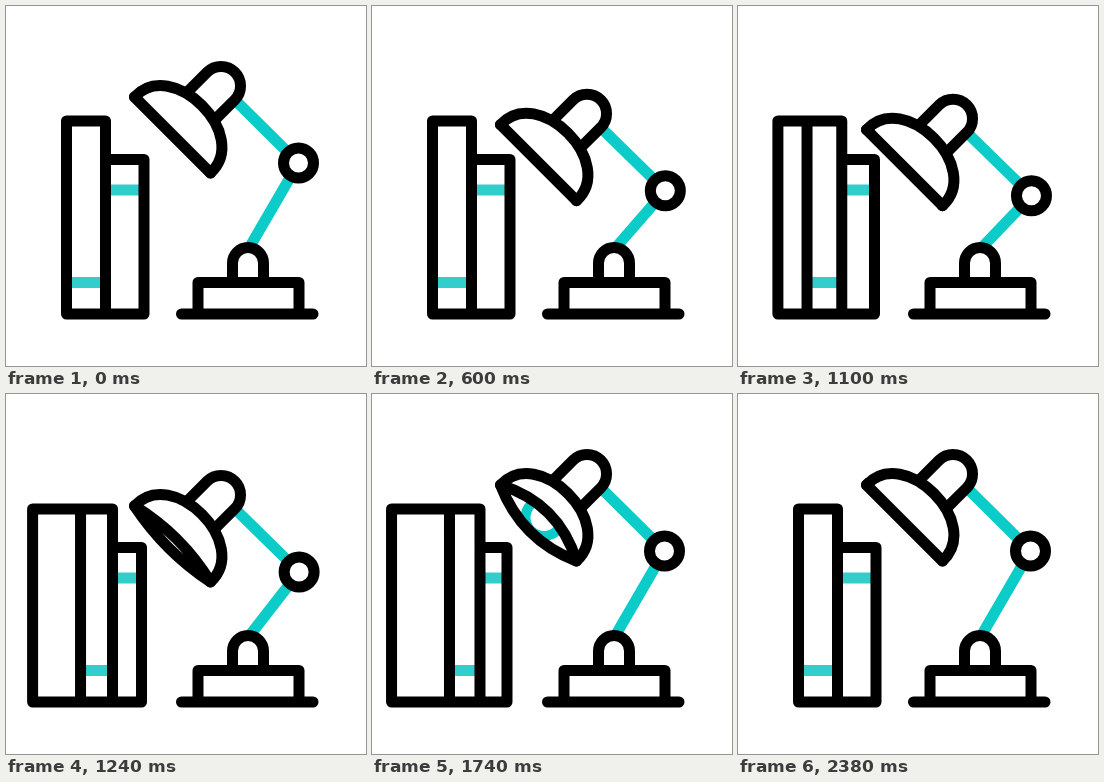
Write an HTML page that moves like this. It is 360 px wide and 360 px high and loops after 2400 ms.

```html
<!DOCTYPE html>
<html lang="en">
<head>
<meta charset="utf-8">
<title>Desk lamp and books</title>
<style>
  html, body { margin: 0; width: 100%; height: 100%; overflow: hidden; background: #fff; }
  svg { display: block; width: 100%; height: 100%; }
  .ink, .teal { fill: none; stroke-width: 11; stroke-linecap: round; stroke-linejoin: round; }
  .ink { stroke: #000; }
  .teal { stroke: #0cccca; stroke-linecap: butt; }
  .paper { fill: #fff; }
  #bands { stroke: #33cdcb; }
  #bulb { stroke-width: 10; }
</style>
</head>
<body>
<svg viewBox="0 0 360 360">
  <path id="bands" class="teal"/>
  <path id="books" class="ink"/>
  <path id="arm" class="teal"/>
  <circle id="elbow" class="ink paper" r="15"/>
  <path class="ink paper" d="M226.5 276V257a15.5 15.5 0 0 1 31 0V276"/>
  <path class="ink paper" d="M192 308V276.5H293V308M175.5 308H307"/>
  <g id="head">
    <path class="ink paper" d="M181 86.4L201.2 66.2A19.5 19.5 0 0 1 228.8 93.8L208.6 114"/>
    <path class="ink paper" d="M204.5 167C224.5 148.5 216 119.5 196 99.5C176 79.5 147 71 128.5 91"/>
    <clipPath id="opening"><path id="hole"/></clipPath>
    <g clip-path="url(#opening)">
      <circle id="bulb" class="teal paper" cx="172" cy="123.5" r="18.5"/>
    </g>
    <path id="rim" class="ink"/>
  </g>
</svg>
<script>
const LOOP = 2400;
const el = id => document.getElementById(id);
const set = (id, name, value) => el(id).setAttribute(name, value);
const mix = (a, b, p) => a + (b - a) * p;

function ease(t, start, end) {
  const x = Math.min(1, Math.max(0, (t - start) / (end - start)));
  return x * x * (3 - 2 * x);
}

function drawBooks(p) {
  const left = mix(60.5, 19.5, p);
  const spine = mix(60.5, 77.5, p);
  const middle = mix(99.5, 108, p);
  const right = mix(138, 135, p);
  set('bands', 'd', `M${spine} 276.5H${middle}M${middle} 184H${right}`);
  set('books', 'd', `M${left} 115H${middle}V308H${left}ZM${spine} 115V308` +
    `M${middle} 153.5H${right}V308H${middle}`);
}

function drawLamp(drop, open) {
  const x = mix(292.5, 293.5, drop);
  const dy = 33.5 * drop;
  const y = 157 + dy;
  set('arm', 'd', `M230 ${95 + dy}L${x} ${y}L242.5 243`);
  set('elbow', 'cx', x);
  set('elbow', 'cy', y);
  set('head', 'transform', `translate(0 ${dy})`);

  const upper = 20 * open;
  const lower = 17 * open;
  const rim = `M128.5 91Q${166.5 + upper} ${129 - upper} 204.5 167` +
    `Q${166.5 - lower} ${129 + lower} 128.5 91Z`;
  set('hole', 'd', rim);
  set('rim', 'd', rim);
}

function render(now) {
  const t = now % LOOP;
  drawBooks(ease(t, 800, 1400) - ease(t, 1730, 2270));
  drawLamp(ease(t, 215, 740) - ease(t, 1060, 1495),
    ease(t, 1100, 1400) - ease(t, 1900, 2330));
  requestAnimationFrame(render);
}
render(performance.now());
</script>
</body>
</html>
```
